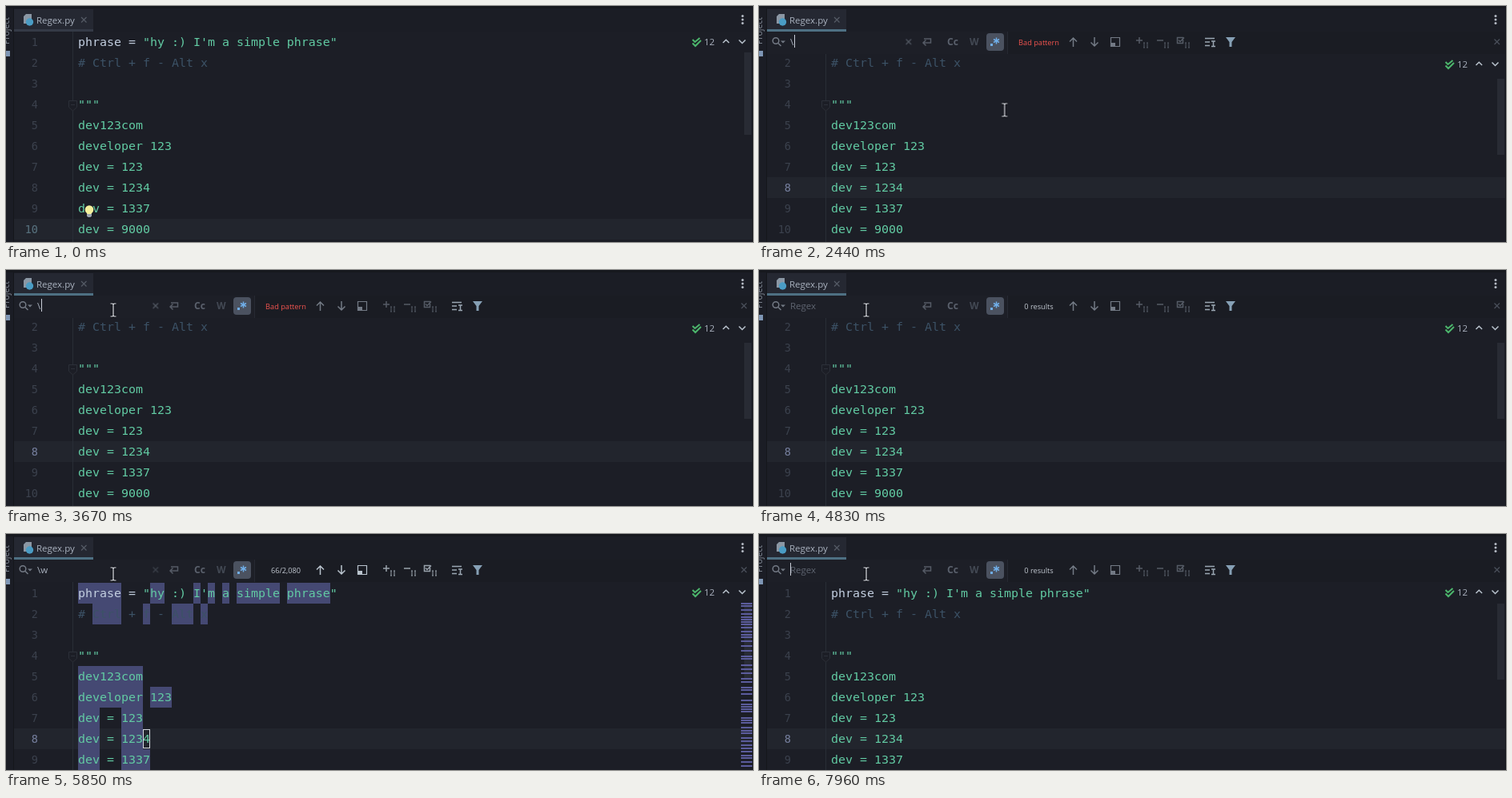
Recreate the animation shown at these times as an HTML page. Size 933 by 295 pixels, loop 8 s.

```html
<!DOCTYPE html>
<html lang="en">
<head>
<meta charset="utf-8">
<title>Regex search</title>
<style>
html, body { margin: 0; width: 100%; height: 100%; overflow: hidden; background: #1c1e26; }
svg { display: block; width: 933px; height: 295px; }
text { font: 11.5px "Open Sans", "Noto Sans", sans-serif; white-space: pre; fill: #aab2bf; }
.code text { font: 14.95px "DejaVu Sans Mono", "Noto Sans Mono", monospace; fill: #62cba3; }
.code .num { font-size: 13.5px; text-anchor: end; fill: #3b414d; }
.code .now { fill: #737c9a; }
.code .idle { fill: #546e7a; }
.code .name { fill: #c3cfe0; }
.code .note { fill: #3c5266; }
.status text { font-size: 9.2px; text-anchor: middle; fill: #c2c8d1; }
.status .bad { fill: #f2544f; }
.line { fill: none; stroke: currentColor; stroke-width: 1.5; }
.thin { stroke-width: 1.2; }
.dim { color: #737a85; }
.faint { color: #555b66; }
.lit { color: #b9c3cd; }

.code, .widget, .thumb, .caret, .pointer { animation: 8s step-end infinite; }
.code { animation-name: scroll; }
.widget { animation-name: drop; }
.thumb { animation-name: thumb; }
.caret { animation-name: caret; }
.pointer { animation-name: point; animation-timing-function: linear; }

@keyframes scroll { 0% { transform: none; } 73.125%, 100% { transform: translateY(29px); } }
@keyframes drop { 0% { transform: none; } 24.625%, 100% { transform: translateY(28px); } }
@keyframes thumb {
  0% { y: 58px; height: 103px; }
  24.625% { y: 91px; height: 95px; }
  73.125%, 100% { y: 87px; height: 95px; }
}
@keyframes caret {
  0% { transform: translateX(44px); }
  52.5% { transform: translateX(39px); }
  67.5% { transform: translateX(44px); }
  71.625% { transform: translateX(53px); }
  93.625% { transform: translateX(44px); }
  98%, 100% { transform: translateX(39px); }
}
@keyframes point {
  0%, 4% { transform: translate(425px, 277px); animation-timing-function: ease-out; }
  9%, 29% { transform: translate(435px, 217px); }
  30.5% { transform: translate(307px, 130px); animation-timing-function: ease-out; }
  32% { transform: translate(286px, 121px); animation-timing-function: ease-in-out; }
  39%, 100% { transform: translate(134px, 50px); }
}
</style>
</head>
<body>
<svg viewBox="0 0 933 295">
  <defs>
    <g id="tools" class="line">
      <path d="M392.500 51V40m-4.500 4.500l4.500-4.500l4.500 4.500M419 39v11m-4.500-4.500l4.500 4.500l4.500-4.500"/>
      <path class="thin" d="M439.500 39.500h11v11h-11z"/>
      <path d="M440 46h5v5h-5z" fill="currentColor" stroke="none"/>
    </g>
    <g id="picks" class="line">
      <path d="M471 43h8m-4-4v8M497 43h8M522.500 39.500h7v7h-7zM524 42.500l2 2l5-5"/>
      <path id="bars" d="M480 46h2m-1 0v6m-1 0h2M484 46h2m-1 0v6m-1 0h2" stroke-width="1"/>
      <use href="#bars" x="26"/>
      <use href="#bars" x="52"/>
    </g>
    <path id="cross" d="M0 0l6.500 6.500m0-6.500l-6.500 6.500"/>
    <path id="beam" d="M-3.500-8h2.500l1 1l1-1h2.500M0-7v14M-3.500 8h2.500l1-1l1 1h2.500" fill="none"/>
  </defs>

  <rect width="933" height="295" fill="#1c1e26"/>

  <g class="code">
    <rect data-on="0-880" x="10" y="266" width="922" height="26" fill="#22252d"/>
    <rect data-on="880-8000" x="10" y="214" width="922" height="26" fill="#22252d"/>
    <path d="M83.500 0V295" stroke="#292d36"/>
    <path d="M78.500 118.500h10v8l-5 4.500l-5-4.500z" fill="#1c1e26" stroke="#2c3039"/>
    <path d="M81 123.500h5" stroke="#2c3039"/>
    <g id="hits" data-on="5850-7610" fill="#454973"></g>
    <g id="rows"></g>
    <rect data-on="5850-7610" x="171.500" y="215.500" width="8" height="23" fill="none" stroke="#d5d8df"/>
    <rect data-on="880-1370 1870-1970" x="179" y="216" width="2" height="21" fill="#c3cfe0"/>
    <g data-on="0-880">
      <path d="M101 259h6v3.500l-1.500 1.500h-3l-1.500-1.500z" fill="#9aa3ad"/>
      <circle cx="104" cy="254.500" r="5.300" fill="#f4f09c"/>
      <path d="M101.500 257h5v3h-5z" fill="#f4f09c"/>
    </g>
  </g>

  <rect class="thumb" x="922" y="58" width="9" height="103" fill="#282b34"/>
  <g id="marks" data-on="5850-7610" fill="#5b5c9c"></g>

  <g class="widget">
    <path class="line" d="M857.500 42l3 3l6-5M857.500 46.500l3.500 3.500l7-7" style="color:#4cb66c;stroke-width:2"/>
    <text x="872" y="49">12</text>
    <path class="line lit" d="M895.500 46l3.800-3.800l3.800 3.800M915.500 42.500l4 4l4-4"/>
  </g>

  <!-- find bar -->
  <g data-on="1970-8000">
    <rect x="10" y="32" width="922" height="28" fill="#1a1c23"/>
    <rect x="10" y="32" width="300" height="28" fill="#1d1f27"/>
    <path d="M310.500 32v28" stroke="#262932"/>
    <g class="line dim">
      <circle cx="21" cy="43.500" r="3.800"/>
      <path d="M24 46.500l3.500 3.500"/>
    </g>
    <path d="M27 43.500h6l-3 3z" fill="#737a85"/>

    <text data-on="1970-4200 5400-5730 7490-7840" x="39" y="49">\</text>
    <text data-on="5730-7490" x="39" y="49">\w</text>
    <text data-on="4200-5400 7840-8000" x="39" y="49" style="fill:#5f6571">Regex</text>
    <g class="caret">
      <rect data-on="1970-2830 3330-3830 4330-4830 5330-5830 6330-6830 7330-8000" y="36" width="1" height="16" fill="#c9ced8"/>
    </g>

    <g class="line thin">
      <use href="#cross" x="183.500" y="41.500" class="faint" data-on="1970-4200"/>
      <use href="#cross" x="183.500" y="41.500" style="color:#3e434d" data-on="5400-7840"/>
      <use href="#cross" x="918.500" y="41.500" style="color:#4a505b"/>
    </g>
    <path class="line faint" d="M206 41h8.500v5h-9.500m3.500-3.500l-3.500 3.500l3.500 3.500"/>
    <text x="235" y="49" style="font-weight:700;font-size:12px;fill:#5b616d">Cc</text>
    <text x="263" y="49" style="font-weight:700;font-size:12px;fill:#434954">W</text>
    <rect x="284" y="34" width="22" height="22" rx="4" fill="#4b5260"/>
    <rect x="289" y="47" width="3" height="3" fill="#70aee8"/>
    <path class="line" style="color:#70aee8" d="M296.500 39.500v8M293 41.500l7 4m0-4l-7 4"/>

    <g class="status">
      <text class="bad" data-on="1970-4330 5520-5850 7610-7960" x="349.500" y="48.500">Bad pattern</text>
      <text data-on="4330-5520 7960-8000" x="349.500" y="48.500">0 results</text>
      <text data-on="5850-7610" x="349.500" y="48.500">66/2,080</text>
    </g>

    <g data-on="1970-5850 7610-8000">
      <use href="#tools" class="dim"/>
      <use href="#picks" class="faint"/>
    </g>
    <g data-on="5850-7610">
      <use href="#tools" class="lit"/>
      <use href="#picks" style="color:#99a2ac"/>
    </g>
    <path class="line" style="color:#9ba7b3" d="M557 40.500h12M557 45h6M557 49.500h6M565 44h5m-2.500 0v6.500m-2.500 0h5"/>
    <path d="M583 39h12l-4.500 6v6h-3v-6z" fill="#86a0b5"/>
  </g>

  <!-- tabs and side strip -->
  <rect width="933" height="32" fill="#1b1d25"/>
  <rect width="933" height="3" fill="#16181e"/>
  <rect x="10" y="4" width="99" height="26" fill="#252832"/>
  <rect data-on="0-880" x="10" y="29" width="99" height="3" fill="#343a46"/>
  <rect data-on="880-8000" x="10" y="29" width="99" height="3" fill="#4e7083"/>
  <path d="M25 10h7v12h-10v-9z" fill="#8b97a4"/>
  <circle cx="29.500" cy="20" r="4.700" fill="#4a9cc4"/>
  <text x="38" y="21.500">Regex.py</text>
  <use href="#cross" x="94" y="14" class="line thin faint"/>
  <g fill="#b4bac4">
    <circle cx="920" cy="12.500" r="1.500"/>
    <circle cx="920" cy="17" r="1.500"/>
    <circle cx="920" cy="21.500" r="1.500"/>
  </g>
  <rect y="3" width="9" height="292" fill="#1b1d25"/>
  <path d="M9.500 3v292" stroke="#14161b"/>
  <text transform="translate(4 48) rotate(-90)" style="font-size:10.500px;fill:#858d99">Project</text>
  <rect y="56" width="5" height="7" fill="#7e96b5"/>
  <path d="M932.500 0v295" stroke="#14161b"/>

  <g class="pointer">
    <g data-on="320-8000">
      <use href="#beam" stroke="#111319" stroke-width="3"/>
      <use href="#beam" stroke="#dfe2e7" stroke-width="1.200"/>
    </g>
  </g>
</svg>

<script>
const LOOP = 8000, CHAR = 9, LEFT = 90, ROW = 26, TOP = 32;
const lines = [
  `phrase = "hy :) I'm a simple phrase"`, "# Ctrl + f - Alt x", "", '"""',
  "dev123com", "developer 123", "dev = 123", "dev = 1234", "dev = 1337", "dev = 9000"
];
// line numbers that light up: style and span of time
const current = { 8: ["now", "880-8000"], 10: ["idle", "0-880"] };

function add(parent, tag, attrs, content) {
  const el = document.createElementNS("http://www.w3.org/2000/svg", tag);
  for (const key in attrs) el.setAttribute(key, attrs[key]);
  if (content) el.textContent = content;
  return parent.appendChild(el);
}

const rows = document.getElementById("rows");
const hits = document.getElementById("hits");
const marks = document.getElementById("marks");

lines.forEach((line, i) => {
  const top = TOP + i * ROW, y = top + 18, n = i + 1;
  add(rows, "text", { class: "num", x: 40, y }, String(n));
  if (current[n]) {
    const [style, span] = current[n];
    add(rows, "text", { class: "num " + style, x: 40, y, "data-on": span }, String(n));
  }

  const split = i === 0 ? 9 : 0;
  if (split) add(rows, "text", { class: "name", x: LEFT, y }, line.slice(0, split));
  add(rows, "text", { class: i === 1 ? "note" : "", x: LEFT + split * CHAR, y }, line.slice(split));

  for (const word of line.matchAll(/\w+/g)) {
    // the selected match on line 8 is outlined instead of filled
    const length = word[0].length - (word[0] === "1234" ? 1 : 0);
    add(hits, "rect", { x: LEFT + word.index * CHAR, y: top, width: length * CHAR, height: ROW });
  }
});

[86, 89, 94, 99, 103, 106, 109, 112, 116, 121, 125, 128, 133, 139, 145, 152, 155, 163, 168, 173,
 180, 184, 191, 194, 199, 207, 212, 215, 218, 221, 229, 232, 235, 241, 245, 248, 254, 258, 263,
 267, 271, 276, 279, 284, 289].forEach(y => add(marks, "rect", { x: 918, y, width: 14, height: 2 }));

// data-on lists the spans of time, in ms, in which an element is visible
for (const el of document.querySelectorAll("[data-on]")) {
  const frames = [];
  const key = (ms, opacity) => frames.push({ offset: ms / LOOP, opacity, easing: "step-end" });
  const spans = el.dataset.on.split(" ").map(s => s.split("-").map(Number));
  if (spans[0][0] > 0) key(0, 0);
  for (const [from, to] of spans) {
    key(from, 1);
    key(to, to < LOOP ? 0 : 1);
  }
  if (frames[frames.length - 1].offset < 1) key(LOOP, 0);
  el.animate(frames, { duration: LOOP, iterations: Infinity });
}
</script>
</body>
</html>
```
